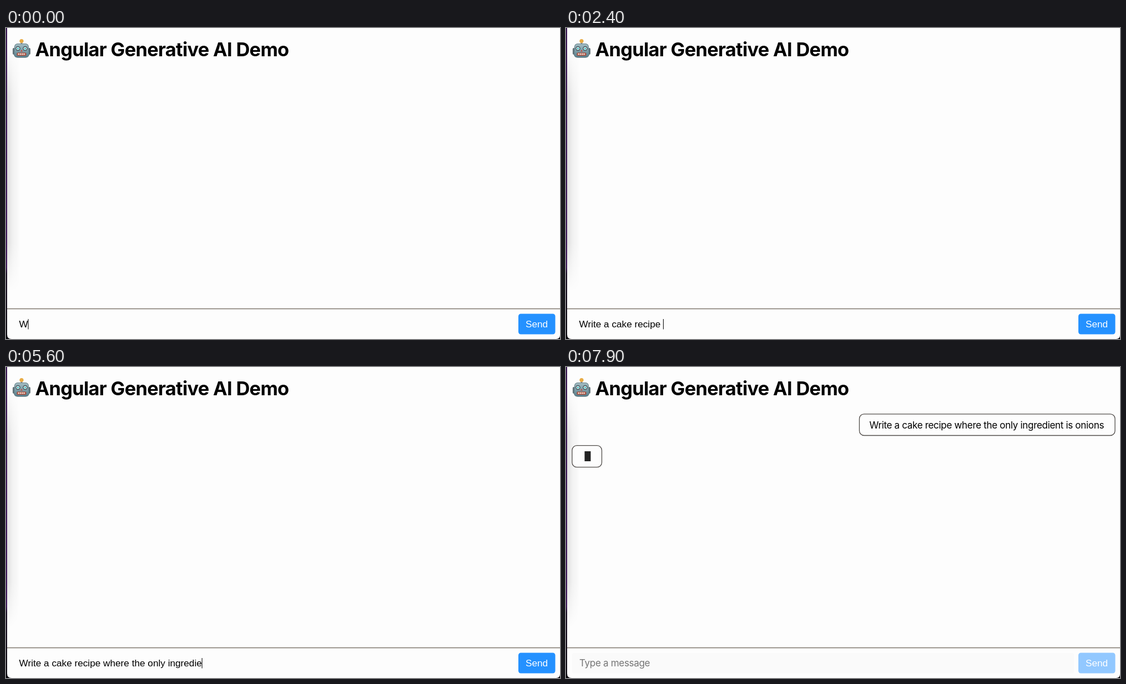
Write an HTML page that moves like this. It is 998 by 561 pixels and loops after 8000 ms.

```html
<!DOCTYPE html>
<html lang="en">
<head>
<meta charset="utf-8">
<title>Generative AI Demo</title>
<style>
  html, body { margin: 0; width: 100%; height: 100%; overflow: hidden; background: #fdfdfd; }
  svg { display: block; width: 998px; height: 561px; }
  text { font-family: Inter, Roboto, sans-serif; font-size: 17.1px; letter-spacing: -0.36px; white-space: pre; }
  #title { font-size: 34.4px; font-weight: 700; letter-spacing: -0.7px; }
  .arial { font-family: "Liberation Sans", Arial, sans-serif; font-size: 17.2px; letter-spacing: 0; }
  .bubble { fill: #fdfdfd; stroke: #514d4a; stroke-width: 1.3; }
</style>
</head>
<body>
<svg viewBox="0 0 998 561">
  <defs>
    <linearGradient id="shade">
      <stop offset="0" stop-color="#000" stop-opacity=".13"/>
      <stop offset=".4" stop-color="#000" stop-opacity=".05"/>
      <stop offset="1" stop-color="#000" stop-opacity="0"/>
    </linearGradient>
    <linearGradient id="fadeY" x2="0" y2="1">
      <stop offset="0" stop-color="#000"/>
      <stop offset=".2" stop-color="#fff"/>
      <stop offset=".8" stop-color="#fff"/>
      <stop offset="1" stop-color="#000"/>
    </linearGradient>
    <mask id="soft"><rect y="35" width="40" height="440" fill="url(#fadeY)"/></mask>
    <linearGradient id="edge" x2="0" y2="1">
      <stop offset="0" stop-color="#35124f"/>
      <stop offset=".77" stop-color="#3b1457"/>
      <stop offset=".79" stop-color="#150a20"/>
      <stop offset="1" stop-color="#08060c"/>
    </linearGradient>
    <linearGradient id="metal" x2="0" y2="1">
      <stop offset="0" stop-color="#a3bcc2"/>
      <stop offset=".55" stop-color="#7b9ca6"/>
      <stop offset="1" stop-color="#587a86"/>
    </linearGradient>
  </defs>

  <rect width="998" height="561" fill="url(#edge)"/>
  <path d="M2 0H998V554Q998 561 991 561H10Q2 561 2 553Z" fill="#fdfdfd"/>
  <rect id="shadow" x="2" y="35" width="24" height="440" fill="url(#shade)" mask="url(#soft)"/>

  <g id="robot">
    <path d="M28 26V31" stroke="#8a8f92" stroke-width="3"/>
    <circle cx="28" cy="23.5" r="3.6" fill="#e9ac45"/>
    <rect x="12" y="36" width="5" height="12" rx="2" fill="#65757b"/>
    <rect x="39" y="36" width="5" height="12" rx="2" fill="#65757b"/>
    <path d="M20 28.5H36Q40 29 40.500 33L41.500 47Q41.500 53 35 53.200H21Q14.500 53 14.500 47L15.500 33Q16 29 20 28.500Z" fill="url(#metal)" stroke="#567079" stroke-width=".8"/>
    <g fill="#e9f4f3" stroke="#41535b" stroke-width="1.400">
      <circle cx="21.500" cy="37" r="3.500"/>
      <circle cx="34.500" cy="37" r="3.500"/>
    </g>
    <circle cx="21.500" cy="37" r="1.500" fill="#2bb5b9"/>
    <circle cx="34.500" cy="37" r="1.500" fill="#2bb5b9"/>
    <path d="M28 39L30 42.500H26Z" fill="#c8473b"/>
    <rect x="19.500" y="44.500" width="17" height="5.500" rx="2" fill="#a84839"/>
    <path d="M21.500 47.200H35" stroke="#f1e8dc" stroke-width="2.800" stroke-dasharray="2.300 1"/>
  </g>
  <text id="title" x="52.500" y="50.500">Angular Generative AI Demo</text>

  <g id="chat">
    <rect class="bubble" x="528.500" y="84.800" width="460.500" height="38.700" rx="8.500"/>
    <text id="sent" x="546.500" y="110.500"></text>
    <rect class="bubble" x="11" y="141.700" width="53.500" height="39" rx="8.500"/>
    <rect x="33.500" y="152" width="11" height="18" fill="#222"/>
  </g>

  <path d="M2 506.500H998" stroke="#7d766b" stroke-width="1.500"/>
  <g id="idle">
    <rect x="11" y="516" width="904" height="36.500" rx="3" fill="#fafafa"/>
    <text x="24" y="540" fill="#757575">Type a message</text>
  </g>
  <g id="entry">
    <text id="typed" class="arial" x="23.500" y="539.700"></text>
    <rect id="caret" y="525" width="1.100" height="18.500" fill="#111"/>
  </g>
  <rect id="button" x="923" y="515.500" width="66.500" height="37" rx="4.500"/>
  <text id="send" class="arial" x="936" y="539.700" fill="#fff">Send</text>
</svg>
<script>
  const LOOP = 8000, SEND_AT = 7200;
  const message = "Write a cake recipe where the only ingredient is onions";
  const el = id => document.getElementById(id);

  // Bursts of even typing: [start ms, end ms, first length, last length]
  const bursts = [
    [0, 700, 1, 5],
    [900, 1500, 6, 13],
    [1600, 2000, 14, 17],
    [2200, 2400, 18, 20],
    [2500, 3000, 21, 27],
    [3100, 3200, 29, 30],
    [3400, 3500, 31, 32],
    [4000, 4600, 33, 36],
    [4800, 6400, 37, 49],
    [6500, 6500, 50, 50],
    [6700, 7100, 51, 55]
  ];

  function textAt(t) {
    if (t >= 3600 && t < 3800) return message.slice(0, 32) + "o";
    const [start, end, from, to] = bursts.filter(b => b[0] <= t).pop();
    const k = end > start ? Math.min(1, (t - start) / (end - start)) : 1;
    return message.slice(0, Math.floor(from + (to - from) * k + 0.001));
  }

  const show = (id, on) => el(id).setAttribute("display", on ? "inline" : "none");

  function draw(time) {
    const t = Math.floor(time % LOOP / 100) * 100;
    const sent = t >= SEND_AT;
    show("chat", sent);
    show("idle", sent);
    show("entry", !sent);
    el("button").setAttribute("fill", sent ? "#92c8ff" : "#2491ff");
    el("shadow").setAttribute("opacity", t < 4700 ? 1 : 0.9);
    if (!sent) {
      const typed = el("typed");
      typed.textContent = textAt(t);
      el("caret").setAttribute("x", 23.3 + typed.getComputedTextLength());
    }
  }

  el("sent").textContent = message;
  const origin = performance.now();
  function tick() {
    draw(performance.now() - origin);
    requestAnimationFrame(tick);
  }
  tick();
</script>
</body>
</html>
```
